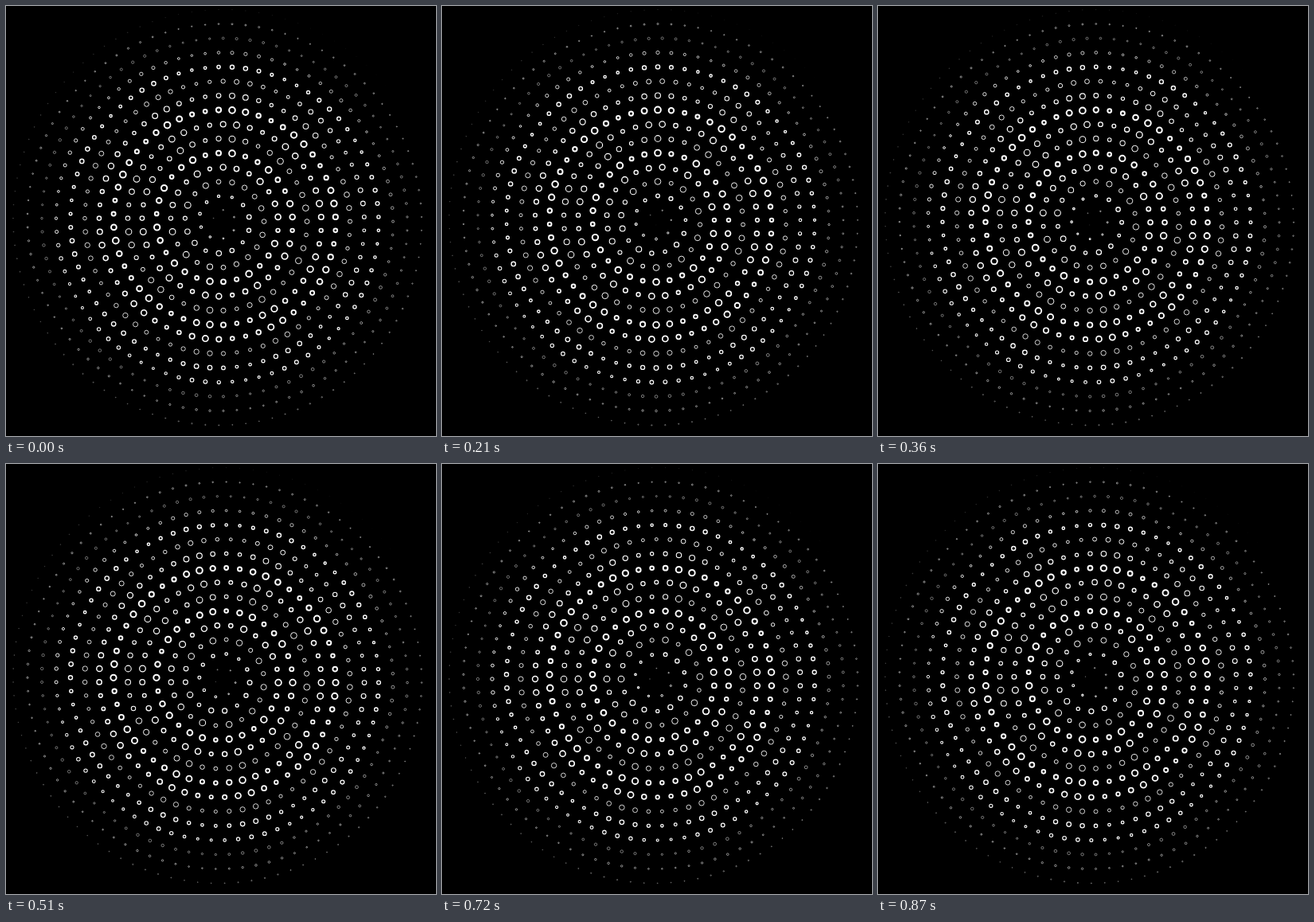
These frames come from a looping animation (540x540 px, 0.9 s). An HTML page with a canvas:

```html
<!DOCTYPE html>
<html lang="en">
<head>
<meta charset="utf-8">
<title>Spiral of rings</title>
<style>
  html, body { margin: 0; width: 100%; height: 100%; overflow: hidden; background: #000; }
  canvas { display: block; width: 540px; height: 540px; }
</style>
</head>
<body>
<canvas id="stage" width="540" height="540"></canvas>
<script>
const ctx = document.getElementById('stage').getContext('2d');
const TAU = Math.PI * 2;
const SIZE = 540, CENTER = SIZE / 2;
const LOOP = 900, STEPS = 30;
const COUNT = 750, TURNS = 15, PITCH = 18;
const SPOKES = 10;

// Rings grow out of the centre and shrink towards the rim.
function ringRadius(turn, phase) {
  const grow = Math.min(1, (turn / 2.5) ** 1.4);
  const shrink = Math.min(1, ((TURNS - turn) / 7.25) ** 0.75);
  const wave = 1 - 0.25 * Math.sin(TAU * (SPOKES * turn + phase));
  return 3.1 * grow * shrink * wave;
}

// Line weight swells in broad bands around the centre.
function lineWeight(turn) {
  const band = 1.45 + 0.55 * Math.cos(TAU * (turn - 1.4) / 3.15);
  const inner = Math.min(1, turn / 2.5);
  const outer = Math.min(1, ((TURNS - turn) / 6.5) ** 0.8);
  return band * inner * outer;
}

function draw(phase) {
  ctx.fillStyle = '#000';
  ctx.fillRect(0, 0, SIZE, SIZE);
  ctx.strokeStyle = '#fff';
  for (let i = 0; i < COUNT; i++) {
    // The square root keeps equal spacing along the spiral.
    const turn = TURNS * Math.sqrt((i + phase) / COUNT);
    if (turn >= TURNS) continue;
    const angle = TAU * turn, distance = PITCH * turn;
    ctx.lineWidth = lineWeight(turn);
    ctx.beginPath();
    ctx.arc(CENTER + distance * Math.cos(angle),
            CENTER + distance * Math.sin(angle),
            ringRadius(turn, phase), 0, TAU);
    ctx.stroke();
  }
}

const start = performance.now();
function tick() {
  const elapsed = (performance.now() - start) % LOOP;
  const step = Math.floor(elapsed / LOOP * STEPS);
  draw((step + 1) / STEPS);
  requestAnimationFrame(tick);
}
tick();
</script>
</body>
</html>
```
